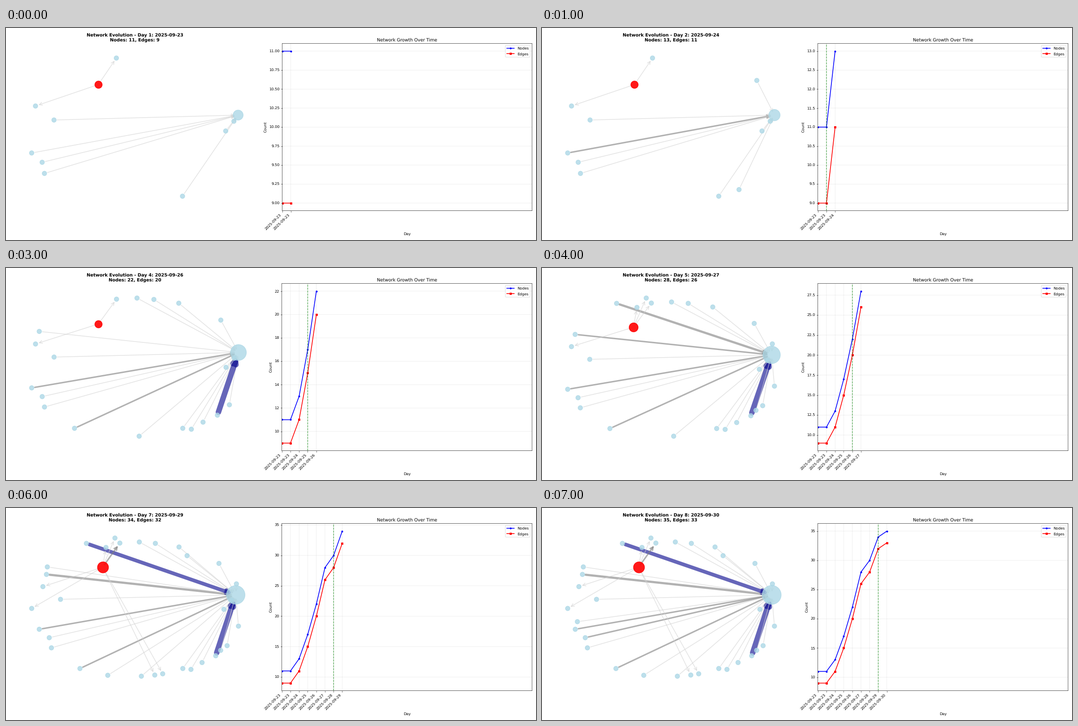
A matplotlib script that plays this animation: 1183x473 px, repeating every 8 s.

```python
import math

import matplotlib.pyplot as plt
from matplotlib.animation import FuncAnimation
from matplotlib.patches import FancyArrowPatch

W, H, DPI = 1183, 473, 59.15
DAYS = 8
SPAN = 29

# Soft, unsnapped strokes and glyphs.
plt.rcParams.update({"path.snap": False, "text.hinting": "none"})

# The network settles on a ring: day -> {reach: bearings clockwise from east}.
TO_HUB = {
    1: {1.0: [62.5, 144], 0.98: [161], 0.94: [152, 354], 0.86: [2],
        0.73: [189]},
    2: {1.03: [322, 51]},
    3: {1.035: [121], 0.98: [209], 0.945: [272.5, 282]},
    4: {1.05: [32, 42, 59], 1.0: [86.5], 0.97: [296]},
    5: {1.037: [243, 341, 15.3, 37]},
    6: {1.03: [214.5], 0.9: [304]},
    7: {1.02: [105]},
    8: {0.93: [167]},
}
FROM_RED = {
    1: {0.94: [261, 198.5]},
    5: {1.02: [259], 0.91: [252]},
    7: {1.0: [179, 79, 74.5]},
}
# Links that gain weight: bearing -> {day: weight}.
BUSY = {161: {2: 2}, 121: {3: 2}, 42: {4: 8}, 243: {5: 3, 7: 5},
        209: {5: 2, 7: 3}, 261: {7: 2}, 152: {8: 2}}


def polar(reach, bearing):
    a = math.radians(bearing)
    return reach * math.cos(a), reach * math.sin(a)


HUB = polar(0.99, 349.6)
RED = polar(0.659, 241.6)

fig = plt.figure(figsize=(20, H / DPI), dpi=DPI)
net = fig.add_axes([0, 0, 1, 1])
chart = fig.add_axes([0, 0, 1, 1], label="chart")


def place(ax, left, right, top=34.7, bottom=407.6):
    ax.set_position([left / W, 1 - bottom / H,
                     (right - left) / W, (bottom - top) / H])


def weight(bearing, day):
    steps = BUSY.get(bearing, {})
    return max([w for start, w in steps.items() if start <= day], default=1)


def present(groups, day):
    """Position and link weight of every leaf that has joined by a day."""
    return [(polar(reach, b), weight(b, day))
            for start, rings in groups.items() if start <= day
            for reach, bearings in rings.items() for b in bearings]


def counts(day):
    """Node and edge totals at the end of a day."""
    edges = len(present(TO_HUB, day)) + len(present(FROM_RED, day))
    return edges + 2, edges


def padded(values):
    lo, hi = min(values), max(values)
    pad = 0.105 * (hi - lo)
    return lo - pad, hi + pad


def link(start, end, w):
    color = "darkblue" if w >= 5 else "gray" if w >= 2 else "lightgray"
    shrink = 300 ** 0.5 / 2
    net.add_patch(FancyArrowPatch(
        start, end, arrowstyle="->", mutation_scale=20,
        linewidth=min(2 * w, 15), color=color, alpha=0.6,
        shrinkA=shrink, shrinkB=shrink, zorder=1))


def dots(points, sizes, color, alpha):
    xs, ys = zip(*points)
    net.scatter(xs, ys, s=sizes, c=color, alpha=alpha, linewidths=1.5,
                zorder=2)


def draw_network(day):
    net.clear()
    net.axis("off")
    inward, outward = present(TO_HUB, day), present(FROM_RED, day)
    leaves = [spot for spot, _ in inward + outward]

    for spot, w in inward:
        link(spot, HUB, w)
    for spot, w in outward:
        link(RED, spot, w)
    dots(leaves + [HUB], [150] * len(leaves) + [50 + 100 * len(inward)],
         "lightblue", 0.8)
    dots([RED], [200 + 100 * len(outward)], "red", 0.9)

    xs, ys = zip(*leaves, HUB, RED)
    net.set_xlim(*padded(xs))
    net.set_ylim(*padded(ys)[::-1])
    nodes, edges = counts(day)
    net.set_title(f"Network Evolution - Day {day}: 2025-09-{22 + day}\n"
                  f"Nodes: {nodes}, Edges: {edges}",
                  fontsize=12, fontweight="bold")


def draw_chart(day):
    chart.clear()
    ticks = range(day + 1)
    dates = [max(d, 1) for d in ticks]
    nodes, edges = zip(*(counts(d) for d in dates))
    chart.plot(ticks, nodes, "b-o", linewidth=2, markersize=4, label="Nodes")
    chart.plot(ticks, edges, "r-s", linewidth=2, markersize=4, label="Edges")
    if day > 1:
        chart.axvline(day - 1, color="green", linestyle="--", alpha=0.7)
    chart.set_xlim(0, SPAN)
    chart.set_xticks(ticks, [f"2025-09-{22 + d}" for d in dates],
                     rotation=45, ha="right")
    chart.set_xlabel("Day")
    chart.set_ylabel("Count")
    chart.set_title("Network Growth Over Time")
    chart.legend(loc="upper right")
    chart.grid(True, alpha=0.3)


def update(frame):
    day = frame + 1
    # Wider count labels on the first day squeeze both panels a little.
    left = 616.5 if day == 1 else 615.7
    place(net, 8.9, 8.9 + 1174.1 - left)
    place(chart, left, 1174.1)
    draw_network(day)
    draw_chart(day)
    return []


anim = FuncAnimation(fig, update, frames=DAYS, interval=1000,
                     init_func=lambda: [], repeat=True, repeat_delay=0,
                     blit=False)
plt.show()
```
